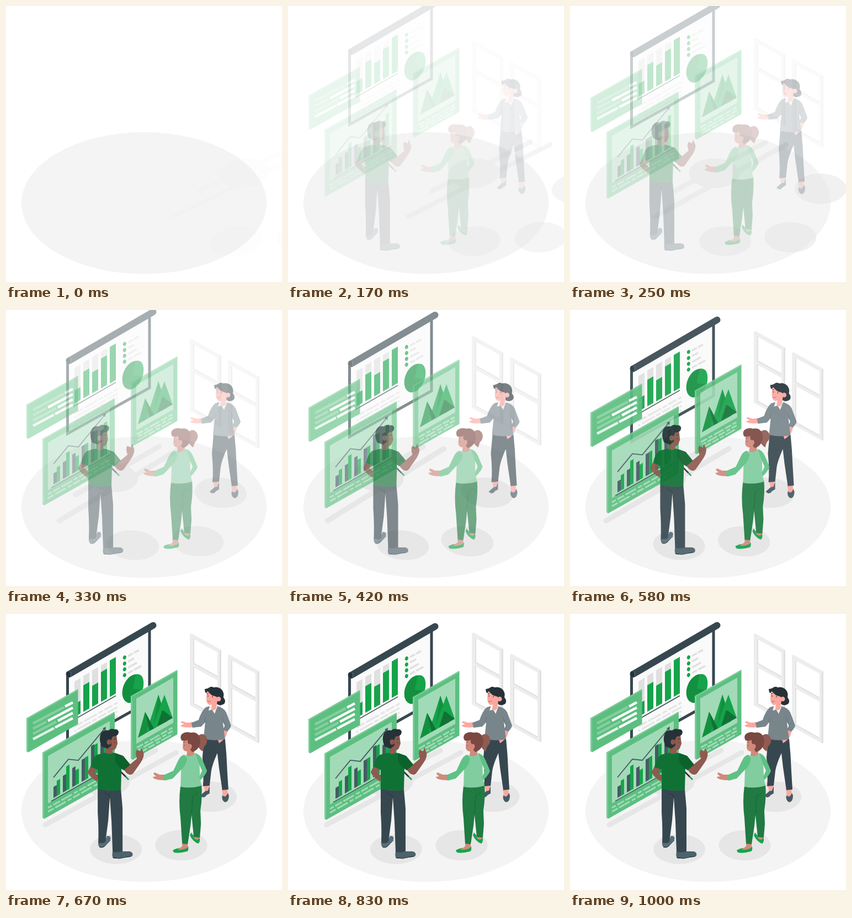
Write an HTML page that moves like this. It is 500 by 500 pixels and loops after 1040 ms.

```html
<!DOCTYPE html>
<html lang="en">
<head>
<meta charset="utf-8">
<title>Team presentation</title>
<style>
html, body { margin: 0; width: 100%; height: 100%; overflow: hidden; background: #fff }
svg { display: block; width: 100vw; height: 100vh }
</style>
</head>
<body>
<svg id="stage" viewBox="0 0 500 500"></svg>
<script>
const DARK = '#37474f', SLATE = '#455a64', BLACK = '#263238';
const GREEN = '#16a34a', LEAF = '#13903f', DEEP = '#0f7234', MID = '#5cbf80', PALE = '#a2dab7';
const BROWN = '#8f5a50', ROSE = '#d08a7c', PINK = '#fba79f', HAIR = '#7b4842';

const path = (fill, d) => `<path fill="${fill}" d="${d}"/>`;
const line = (color, width, d, extra = '') =>
  `<path fill="none" stroke="${color}" stroke-width="${width}" d="${d}" ${extra}/>`;
const oval = (fill, x, y, rx, ry, turn = 0) =>
  `<ellipse fill="${fill}" cx="${x}" cy="${y}" rx="${rx}" ry="${ry}" transform="rotate(${turn} ${x} ${y})"/>`;
const group = (id, ...parts) => `<g id="${id}">${parts.join('')}</g>`;

// Upright wall quad: left top and bottom at x0, rising by slope toward x1
const quad = (fill, x0, x1, top, bottom, slope = .565) => {
  const rise = (x1 - x0) * slope;
  return path(fill, `M${x0} ${top}L${x1} ${top - rise}V${bottom - rise}L${x0} ${bottom}Z`);
};
const rows = (color, width, x0, x1, y, count, gap, dash) =>
  Array.from({ length: count }, (_, i) => line(color, width,
    `M${x0} ${y + i * gap}L${x1} ${y + i * gap - (x1 - x0) * .56}`,
    `stroke-dasharray="${dash}" stroke-dashoffset="${i * 13}"`)).join('');
const slab = (x, right, top, bottom) =>
  quad(MID, x + 3, right, top, bottom) +
  path('#7ccb99', `M${x} ${top}L${x + 3} ${top + 1}V${bottom}L${x} ${bottom - 2}Z`) +
  line('#7ccb99', 2.4, `M${x} ${top + .8}L${right} ${top + .8 - (right - x) * .565}`);

const shadows = group('shadows',
  line('#e6e6e6', 9, 'M71 382L311 251M108 335L274 247', 'stroke-linecap="round"'),
  oval('#e6e6e6', 180, 303, 46, 27), oval('#e6e6e6', 198, 426, 47, 27),
  oval('#e6e6e6', 316.5, 419, 47, 27.5), oval('#e6e6e6', 372, 331, 47, 27.5));

const pane = (x, y) =>
  path('#ededed', `M${x} ${y}l3 -1 54 30v129l-3 1 -54 -30Z`) +
  path('#e0e0e0', `M${x + 54} ${y + 30}l3 -1v129l-3 1Z`) +
  path('#fff', `M${x + 8} ${y + 10}l42 23v43l-42 -23ZM${x + 8} ${y + 61}l42 23v65l-42 -23Z`) +
  line('#dedede', 1.8, `M${x + 7} ${y + 9}v44M${x + 7} ${y + 60}v66l43 24M${x + 7} ${y + 53}l43 24`);
const windows = group('windows', pane(333, 36.5), pane(402, 75));

const columns = [[122, 163], [112, 129], [102, 130], [93, 105], [84, 84]];
const screen = group('screen',
  path('#fafafa', 'M113 112L260 30V158L113 240Z'),
  line(DARK, 5, 'M111.500 108V241L260 158V27'),
  line(DARK, 12, 'M114.500 109L266.500 20.500', 'stroke-linecap="round"'),
  oval('#263238', 113, 109, 3.5, 5.5, -20), line('#546e7a', 1, 'M117.500 104V113'),
  columns.map(([grey, top], i) => quad('#e0e0e0', 124 + 16 * i, 135 + 16 * i, grey, 186 - 9 * i) +
    quad(GREEN, 124 + 16 * i, 135 + 16 * i, top, 186 - 9 * i)).join(''),
  line(DARK, 1.5, 'M122 192L199 148'),
  rows('#e6e6e6', 3.5, 124, 202, 204, 4, 8, '17 3 27 3 9 3'),
  [78.5, 89.5, 100, 110.5].map(y => oval(GREEN, 214.8, y, 2.9, 3.7, 20)).join(''),
  line('#e0e0e0', 3.5, 'M221 76L230 71M232 70L241 65M221 86L232 80M221 97L237 88M221 107L230 102M232 101L245 94'),
  oval(LEAF, 229.7, 135, 17.5, 27, 22),
  path(GREEN, 'M229.700 135L235 109Q247 107 249 121Q250 129 247 138Z'));

const peaks = group('peaks', slab(226, 310.5, 149, 264), quad(PALE, 236, 303, 153, 235),
  path(LEAF, 'M239 224L252 177L268 207Z'),
  path(GREEN, 'M254 215L276 146L292 194Z'),
  path(LEAF, 'M276 146L292 194L266 208Z'),
  path(GREEN, 'M264 209L287 146L302 188Z'),
  path(DEEP, 'M274 203L283 174L287 176L302 188Z'),
  path(DEEP, 'M252 177L268 207L260 211Z'),
  rows(PALE, 3, 237, 302, 242, 3, 6, '13 3 8 3 20 3'));

const pairs = [[313, 302], [293, 276], [279, 283], [264, 260], [239, 237], [236, 222]];
const trend = group('trend', slab(66, 197, 251, 371), quad(PALE, 76, 188, 257, 343),
  pairs.map(([a, b], i) => quad(SLATE, 86 + 17 * i, 92 + 17 * i, a, 333 - 9.7 * i) +
    quad(GREEN, 92 + 17 * i, 98 + 17 * i, b, 329.6 - 9.7 * i)).join(''),
  line(DARK, 1.3, 'M82 339L188 279'),
  line(SLATE, 1.8, 'M86 296L113 263L131 265L179 207'), path(SLATE, 'M181 204L180 211L175 207Z'),
  rows(PALE, 3, 76, 188, 351, 2, 7, '8 3 14 3 22 4'));

const bullets = [[49, 105, 107], [49, 73, 76], [49, 91, 94], [49, 87, 89]];
const list = group('list', slab(37, 130.5, 189, 250.5),
  bullets.map(([a, b, c], i) => {
    const at = x => `${x} ${160 + 9.5 * i + (121 - x) * .53}`;
    return line(i == 3 ? '#e0f3e6' : '#86cf9f', 4.5, `M${at(a)}L${at(b)}`) +
      line('#fff', 4.5, `M${at(c)}L${at(121)}`);
  }).join(''));

const woman = group('woman',
  path(PINK, 'M358 308H368L367 324L361 325ZM391 316H401L402 329Q398 334 393 329Z'),
  path(SLATE, 'M369 311V325Q364 327 361 331Q356 334 352 329L361 321L366 320ZM392 328Q390 338 397 341Q404 340 404 329L402 324Q398 335 392 328Z'),
  path(DARK, 'M359 225Q378 230 397 226Q400 255 401 285L403 318L392 319L386 278L383 252Q374 272 372 284L369 311L357 312Q359 290 356 260Z'),
  path(PINK, 'M338 196L328 197L319 194Q314 197 323 199L316 202Q321 207 338 205ZM403 208L399 221Q393 230 386 234L384 228Q385 222 394 215L394 208Z'),
  path('#78868c', 'M362 169L369 167L376 177L382 167Q394 169 399 178L408 202Q407 207 401 213L393 210L397 202L393 196L397 227Q377 231 358 226L361 196L354 204L338 206L336 197L349 192Q354 176 362 169Z'),
  line('#66757b', 1, 'M391 186L397 202L395 209M362 187L360 197'),
  path('#f5f5f5', 'M370 165L367 175L374 173L378 181L383 168L380 164Z'),
  path(BLACK, 'M360 136Q366 135 367 134Q372 130 376 133Q385 131 391 137Q396 143 394 151Q399 157 396 162Q390 168 382 163L372 147L361 142Z'),
  path(PINK, 'M364 141L363 152Q363 163 369 165L373 164L372 173Q377 177 381 171L383 158L382 150Q370 147 366 140Z'),
  oval(PINK, 385.5, 154, 4, 4.3),
  line(BLACK, 1, 'M364 145L367 144M372 146L376 148'),
  oval(BLACK, 366, 148.500, .8, 1.1), oval(BLACK, 374, 150, .8, 1.1),
  line('#d8584f', 1, 'M365 158Q368 160 371 158'));

const man = group('man',
  path('#546e7a', 'M167 413L178 412L183 402Q191 401 189 409L181 418Q177 425 170 423Q166 420 167 413Z'),
  path('#4c626c', 'M193 430L211 430L224 430Q231 432 229 438Q225 441 215 441L205 443H195Q191 440 193 430Z'),
  line(BLACK, 1, 'M193 441L205 443L215 441L227 439M169 422Q176 425 182 417L189 410'),
  path(DARK, 'M166 316Q187 322 208 318L211 352V430Q202 433 193 431L191 376L188 332L185 374L180 413Q174 417 167 414Q168 388 166 360Z'),
  line(BLACK, 1, 'M188 333L186 328L178 324'),
  path(BROWN, 'M154 274L148 286Q149 293 165 304L167 293L158 286L168 281Z'),
  line(BLACK, 2.6, 'M208 286L217 295'), line(GREEN, 2.6, 'M217 295L222 300'),
  path(BROWN, 'M211 280L218 288Q224 294 230 289L244 269Q251 258 249 251L245 242L243 249L237 246Q233 250 237 262L224 273Z'),
  path(DEEP, 'M163 256Q180 249 198 252L212 257L225 273L213 283L209 279L208 319Q187 322 166 317V282L153 277Q156 262 163 256Z'),
  path('#0c622b', 'M198 252L212 257L225 273L213 283Q199 275 197 263Z'),
  path(BROWN, 'M181 236V252Q186 255 193 252V247Q199 246 200 240L202 235L200 219L187 217Z'),
  path(BLACK, 'M173 240Q167 226 172 216Q177 209 185 211Q190 206 196 209Q203 208 204 214Q203 222 193 222L190 229L191 238L184 244Z'),
  oval(BROWN, 186.5, 232, 4, 4.8), line('#6d453b', 1, 'M186 230Q188 232 187 234'),
  line(BLACK, 1, 'M195 227L199 226M197 232V234'));

const girl = group('girl',
  path(GREEN, 'M302 428Q309 424 315 424Q322 426 330 421Q331 429 328 430Q314 434 304 432ZM335 396L333 401Q338 412 348 416Q353 412 350 404Q345 407 341 403Z'),
  path(ROSE, 'M319 414L329 415V423Q322 428 310 427L319 421ZM340 402H351L349 407Q345 412 339 404Z'),
  path('#207a42', 'M316 311Q334 318 354 309Q356 330 352 356L353 380L351 405L340 404L336 364L334 384L329 417L319 416L316 370Q312 340 316 311Z'),
  line('#186435', 1, 'M336 362L338 330L347 324'),
  path(ROSE, 'M287 291L278 291L269 287Q264 289 272 294L266 295Q267 301 288 301Z'),
  path('#81cd9f', 'M322 255Q332 259 343 252L350 256L351 296L354 311Q334 317 316 313L317 282L314 262Z'),
  path('#5fc185', 'M322 255L328 262Q325 276 317 282L302 298L287 302L285 292L303 284L312 265Q316 257 322 255ZM343 252Q352 255 356 265L364 284Q363 290 352 301L350 295L355 284L349 270Z'),
  path('#8f5b52', 'M347 221Q357 213 363 223Q367 232 359 240L356 249Q347 243 346 234Z'),
  path(ROSE, 'M321 227L320 242Q321 249 328 249L327 256Q333 260 341 254V240L333 226Z'),
  path(HAIR, 'M318 229Q314 222 319 217Q326 212 334 215Q344 213 349 220Q354 229 350 239Q346 248 337 250L334 246L335 238Q328 236 329 228Q324 231 318 229Z'),
  oval(ROSE, 333, 240, 3.5, 4.4), line(HAIR, 1, 'M323 237V239M321 233L324 232'));

stage.innerHTML = oval('#f4f4f4', 250, 357, 222, 128.5) +
  shadows + windows + screen + peaks + trend + list + woman + man + girl;

// Overshooting ease, cubic-bezier(.36, -.01, .5, 1.38)
const cubic = (a, b, s) => 3 * (1 - s) ** 2 * s * a + 3 * (1 - s) * s * s * b + s ** 3;
function ease(p) {
  let lo = 0, hi = 1;
  for (let i = 0; i < 24; i++) {
    const s = (lo + hi) / 2;
    if (cubic(.36, .5, s) < p) lo = s; else hi = s;
  }
  return cubic(-.01, 1.38, lo);
}

// Smooth curve through evenly spaced values, u in 0..1
function curve(v, u) {
  const n = v.length - 1, i = Math.min(n - 1, Math.floor(u * n)), f = u * n - i;
  const b = v[i], c = v[i + 1], a = v[i - 1] ?? 2 * b - c, d = v[i + 2] ?? c;
  return b + f * ((c - a) + f * ((2 * a - 5 * b + 4 * c - d) + f * (3 * (b - c) + d - a))) / 2;
}

const START = {
  windows: [0, 30], screen: [0, -30], peaks: [0, -30], trend: [0, -30], list: [0, -30],
  woman: [30, 0], man: [-30, 0], girl: [-30, 0]
};
const SLIDE = [221, 141, 31, 0, 1, -2, 0], SKEW = [-.25, -.135, .157, .218, .022, -.025, 0];
const $ = id => document.getElementById(id);

function draw(ms) {
  // 24 pictures a second, changing on 10 ms marks
  let k = 24;
  while (Math.round(k * 25 / 6) * 10 > ms) k--;
  const t = k < 2 ? 0 : k / 24;
  const y = t ? ease(Math.min(1, t + .02)) : 0;
  for (const [id, [dx, dy]] of Object.entries(START)) {
    $(id).setAttribute('transform', `translate(${dx * (1 - y)} ${dy * (1 - y)})`);
    $(id).setAttribute('opacity', Math.max(0, Math.min(1, y)));
  }
  const skew = curve(SKEW, t);
  $('shadows').setAttribute('transform', `matrix(1 0 ${skew} 1 ${curve(SLIDE, t) - 420 * skew} 0)`);
  $('shadows').setAttribute('opacity', Math.min(1, .07 + t * 1.9));
}

const begin = performance.now();
function tick() {
  draw((performance.now() - begin) % 1040);
  requestAnimationFrame(tick);
}
tick();
</script>
</body>
</html>
```
